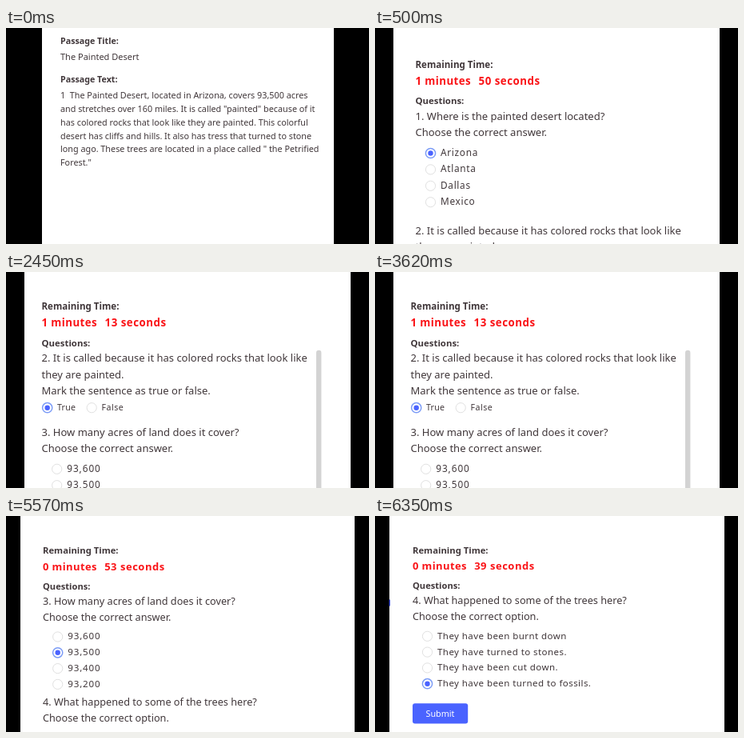
An HTML page that plays this animation: 454x270 px, repeating every 8000 ms.

```html
<!DOCTYPE html>
<html lang="en">
<head>
<meta charset="utf-8">
<title>Reading quiz</title>
<style>
  html, body { margin: 0; width: 100%; height: 100%; overflow: hidden; background: #000; }
  svg { display: block; width: 100vw; height: 100vh; }
  text { font-family: "Noto Sans", "Open Sans", sans-serif; fill: #40373a; white-space: pre; }
  .bold { font-weight: 700; }
  .time { font-weight: 600; fill: #fa1418; }
  .button { fill: #fff; }
</style>
</head>
<body>
<svg id="stage" viewBox="0 0 454 270" xmlns="http://www.w3.org/2000/svg"></svg>
<script>
const LOOP = 8000;
const BLUE = "#4a63ff";
const stage = document.getElementById("stage");

function add(parent, tag, attrs, content) {
  const node = document.createElementNS(stage.namespaceURI, tag);
  for (const key in attrs) node.setAttribute(key, attrs[key]);
  if (content) node.textContent = content;
  parent.append(node);
  return node;
}

function text(g, x, y, size, content, cls = "", spacing = 0) {
  add(g, "text", { x, y, "font-size": size, class: cls, "letter-spacing": spacing }, content);
}

function radio(g, cx, cy, on) {
  add(g, "circle", { cx, cy, r: 6.1, fill: "#fff", stroke: on ? "#7c9cf6" : "#d9d9d9", "stroke-width": on ? 1.5 : 0.8 });
  if (on) add(g, "circle", { cx, cy, r: 3.2, fill: BLUE });
}

function options(g, x, y, step, labels, chosen, size, spacing) {
  labels.forEach((label, i) => {
    radio(g, x, y + i * step, i === chosen);
    text(g, x + 12.5, y + i * step + 3.4, size, label, "", spacing);
  });
}

function scene(start, left, right, draw) {
  const g = add(stage, "g", {});
  add(g, "rect", { x: left, y: 0, width: right - left, height: 270, fill: "#fff" });
  draw(g);
  return { start, g };
}

// Timer heading; `small` is the slightly reduced page zoom.
function header(g, x, y, minutes, seconds, small) {
  const k = small ? 0.977 : 1;
  text(g, x, y, 11.55 * k, "Remaining Time:", "bold");
  text(g, x, y + 21 * k, 13.3 * k, minutes + " minutes", "time", 0.4);
  text(g, x + 79 * k, y + 21 * k, 13.3 * k, seconds + " seconds", "time", 0.52);
  text(g, x, y + 45.3 * k, 11.4 * k, "Questions:", "bold");
}

const numbers = ["93,600", "93,500", "93,400", "93,200"];
const passage = [
  "1  The Painted Desert, located in Arizona, covers 93,500 acres",
  "and stretches over 160 miles. It is called \"painted\" because of it",
  "has colored rocks that look like they are painted. This colorful",
  "desert has cliffs and hills. It also has tress that turned to stone",
  "long ago. These trees are located in a place called \" the Petrified",
  "Forest.\""
];

const scenes = [
  scene(0, 45, 410, g => {
    text(g, 68, 20, 10.7, "Passage Title:", "bold");
    text(g, 68, 40, 11, "The Painted Desert");
    text(g, 68, 68, 10.7, "Passage Text:", "bold");
    passage.forEach((line, i) => text(g, 68, 88.2 + i * 16.8, 10.8, line));
  }),
  scene(500, 23, 431, g => {
    header(g, 50.5, 49.5, 1, 50);
    text(g, 50.5, 115, 13, "1. Where is the painted desert located?");
    text(g, 50.5, 135, 13, "Choose the correct answer.");
    options(g, 69.5, 156.5, 20.4, ["Arizona", "Atlanta", "Dallas", "Mexico"], 0, 11.8, 0.7);
    text(g, 50.5, 258, 13, "2. It is called because it has colored rocks that look like");
    text(g, 50.5, 278, 13, "they are painted.");
  }),
  scene(2450, 23, 431, g => {
    header(g, 44.5, 47.2, 1, 13);
    text(g, 44.5, 112.3, 13, "2. It is called because it has colored rocks that look like");
    text(g, 44.5, 133, 13, "they are painted.");
    text(g, 44.5, 153, 13, "Mark the sentence as true or false.");
    radio(g, 51.7, 169.7, true);
    text(g, 64, 173.3, 10.6, "True", "", 0.2);
    radio(g, 107.2, 169.7, false);
    text(g, 119.5, 173.3, 10.6, "False", "", 0.5);
    text(g, 44.5, 204.5, 13, "3. How many acres of land does it cover?");
    text(g, 44.5, 225, 13, "Choose the correct answer.");
    options(g, 63.7, 246.3, 20.4, numbers.slice(0, 2), -1, 11.8, 0.95);
    add(g, "path", { d: "M388 270V101a3.2 3.2 0 0 1 6.4 0V270Z", fill: "#d3d3d3" });
  }),
  scene(4400, 18, 436, g => {
    header(g, 46, 47.4, 0, 53, true);
    text(g, 46, 110.5, 12.68, "3. How many acres of land does it cover?");
    text(g, 46, 130.5, 12.68, "Choose the correct answer.");
    options(g, 64.7, 151, 19.8, numbers, 1, 11.6, 0.85);
    text(g, 46, 237.3, 12.68, "4. What happened to some of the trees here?");
    text(g, 46, 257, 12.68, "Choose the correct option.");
  }),
  scene(6350, 18, 437, g => {
    header(g, 47, 46.5, 0, 39, true);
    text(g, 47, 109.7, 12.68, "4. What happened to some of the trees here?");
    text(g, 47, 129.7, 12.68, "Choose the correct option.");
    options(g, 65.5, 150.3, 19.8, [
      "They have been burnt down",
      "They have turned to stones.",
      "They have been cut down.",
      "They have been turned to fossils."
    ], 3, 11.5, 0.44);
    add(g, "rect", { x: 47, y: 234.3, width: 69.2, height: 25.2, rx: 3, fill: BLUE });
    text(g, 63.5, 251, 10.8, "Submit", "button");
    add(g, "rect", { x: 17.6, y: 104.5, width: 1.4, height: 8, fill: "#3a4ad0" });
  })
];

function render(t) {
  const current = scenes.findLast(s => s.start <= t);
  for (const s of scenes) s.g.style.display = s === current ? "" : "none";
}

const origin = performance.now();
function tick() {
  render((performance.now() - origin) % LOOP);
  requestAnimationFrame(tick);
}
render(0);
requestAnimationFrame(tick);
</script>
</body>
</html>
```
